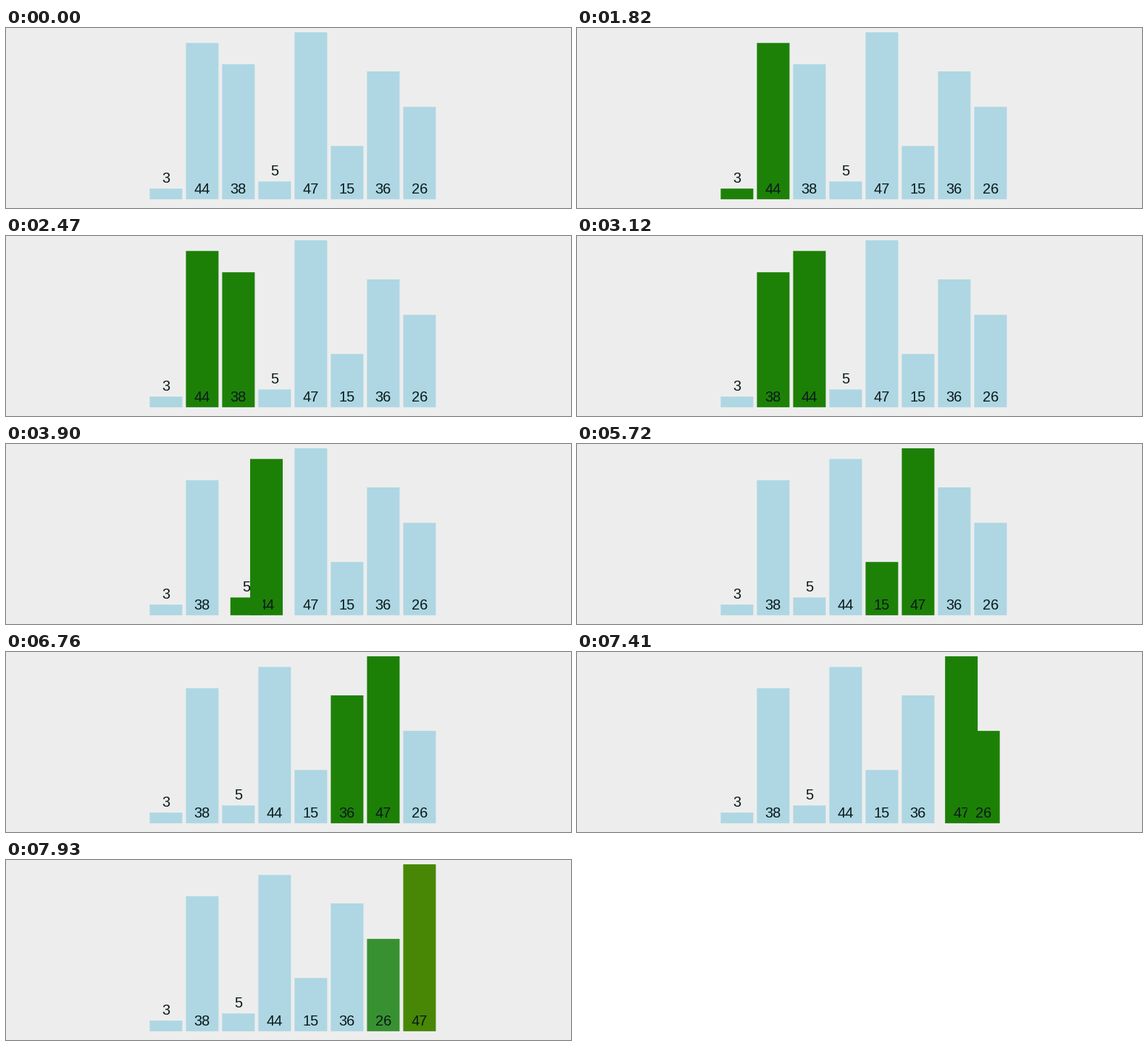
A matplotlib script for the animation above (8 s loop, 780 by 249 pixels).

```python
import numpy as np
import matplotlib.pyplot as plt
from matplotlib.animation import FuncAnimation
from matplotlib.colors import to_rgb
from matplotlib.patches import Rectangle

W, H, DPI = 780, 249, 64
LOOP, TICK, HOLD = 8000, 20, 130      # ms
STEP, FIRST, SECOND = 520, 1370, 2020  # ms

VALUES = [3, 44, 38, 5, 47, 15, 36, 26]
BAR, PITCH, LEFT, BASE, UNIT = 45, 50, 198.4, 236.9, 4.914
BLUE, GREEN, ORANGE = (np.array(to_rgb(c)) for c in ("#aed7e3", "#1c8006", "#ffa500"))


def bubble_pass(values):
    """States of one pass: (slot of each bar, colour of each bar)."""
    order = list(range(len(values)))

    def state(active=(), done=()):
        colors = [BLUE] * len(values)
        for i in active:
            colors[order[i]] = GREEN
        for i in done:
            colors[order[i]] = ORANGE
        return np.argsort(order), np.array(colors)

    states = [state()]
    for i in range(len(values) - 1):
        states.append(state((i, i + 1)))
        a, b = order[i:i + 2]
        if values[a] > values[b]:
            order[i:i + 2] = b, a
            states.append(state((i, i + 1)))
    states.append(state(done=(len(values) - 1,)))
    return states


def ease(p):
    p = min(max(p, 0), 1)
    return 4 * p**3 if p < 0.5 else 1 - 4 * (1 - p)**3


STATES = bubble_pass(VALUES)
STARTS = [0, FIRST] + [SECOND + STEP * k for k in range(len(STATES) - 2)]

fig = plt.figure(figsize=(W / DPI, H / DPI), dpi=DPI, facecolor="#ededed")
ax = fig.add_axes([0, 0, 1, 1])
ax.set(xlim=(0, W), ylim=(H, 0))
ax.axis("off")

bars, labels = [], []
for z, v in enumerate(VALUES):
    top = BASE - v * UNIT
    bar = Rectangle((0, top), BAR, v * UNIT, lw=0, snap=False, zorder=2 * z + 1)
    bars.append(ax.add_patch(bar))
    labels.append(ax.text(0, top - 8 if v < 10 else 229, str(v), ha="center",
                          va="baseline", family="Liberation Sans", color="#0b191b",
                          fontsize=20 * 72 / DPI, zorder=2 * z + 2))


def draw(i):
    t = (i * TICK + TICK // 2) // HOLD * HOLD
    k = max(n for n, s in enumerate(STARTS) if s <= t)
    p = ease((t - STARTS[k]) / STEP)
    (slots0, colors0), (slots1, colors1) = STATES[max(k - 1, 0)], STATES[k]
    xs = LEFT + PITCH * (slots0 + (slots1 - slots0) * p)
    colors = colors0 + (colors1 - colors0) * p
    for bar, label, x, color in zip(bars, labels, xs, colors):
        bar.set_x(x)
        bar.set_facecolor(color)
        label.set_x(x + BAR / 2)
    return bars + labels


anim = FuncAnimation(fig, draw, frames=LOOP // TICK, interval=TICK,
                     repeat=True, repeat_delay=0, blit=False)
plt.show()
```
